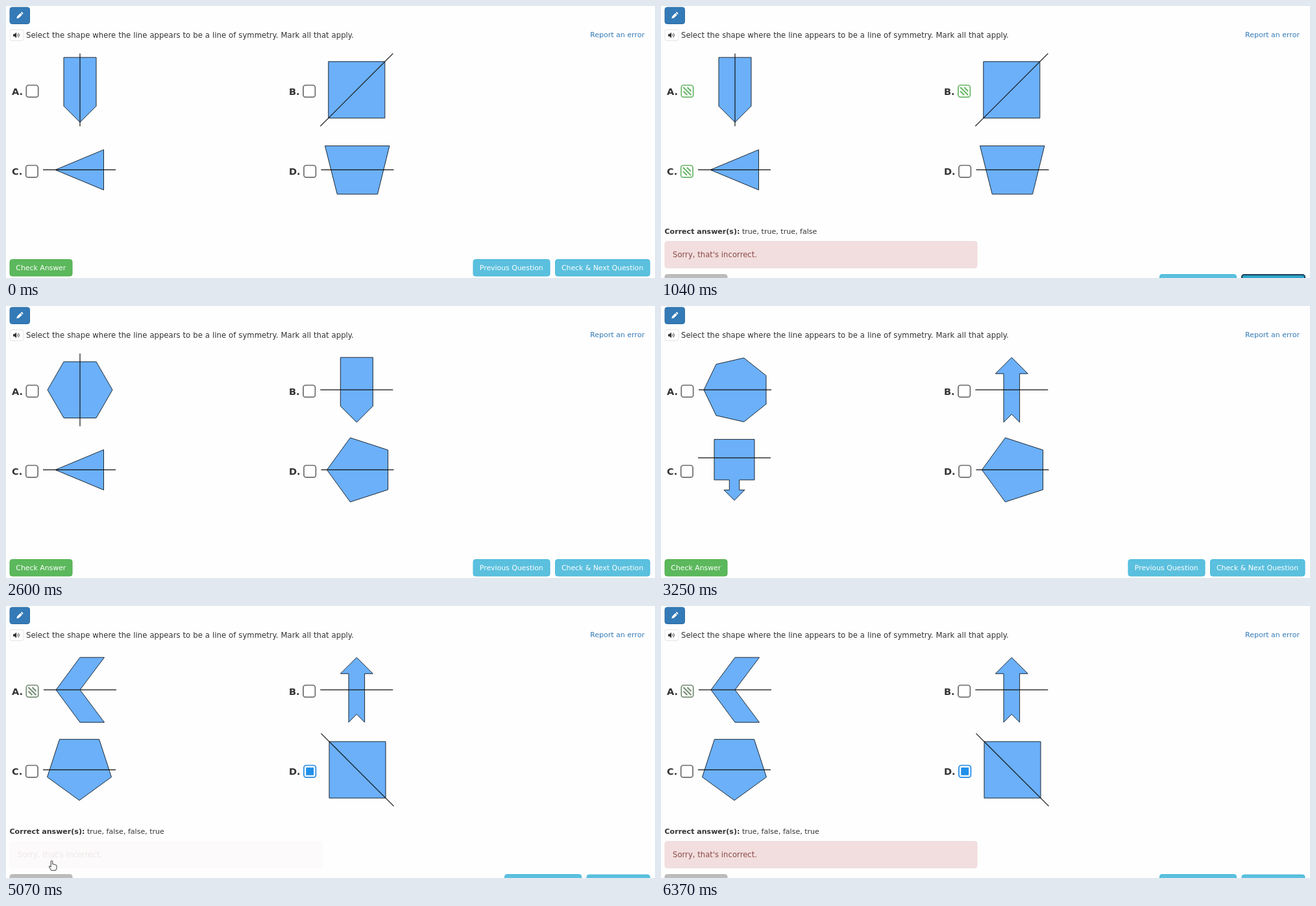
These frames come from a looping animation (1000 by 419 pixels, 7.02 s). An HTML page:

```html
<!DOCTYPE html>
<html lang="en">
<head>
<meta charset="utf-8">
<title>Line of symmetry quiz</title>
<style>
  html, body { margin: 0; width: 100%; height: 100%; overflow: hidden; background: #fefefe; }
  svg { display: block; width: 100%; height: 100%; font-family: "DejaVu Sans", Verdana, sans-serif; fill: #333; }
  .title, .alert text { font-size: 11.66px; }
  .title { word-spacing: .32px; }
  .link { font-size: 11.03px; fill: #337ab7; }
  .label { font-size: 14.6px; font-weight: bold; }
  .answer { font-size: 11.05px; }
  .answer tspan { font-weight: bold; }
  .btn text { font-size: 10.86px; fill: #fff; text-anchor: middle; }
  .success { fill: #5cb85c; stroke: #4cae4c; }
  .info { fill: #5bc0de; stroke: #46b8da; }
  .used { fill: #bcbcbc; stroke: #b8b8b8; }
  .focused { fill: #31a5cb; stroke: #173f55; stroke-width: 2; }
  .shape { fill: #6bb0f9; stroke: #1c2733; stroke-width: 1; }
  .axis { stroke: #111; stroke-width: 1.2; }
  .box { fill: #fff; stroke: #6c6c6c; stroke-width: 1.7; }
  .missed .box, .missed path { stroke: #66b566; }
  .dull .box, .dull path { stroke: #728c70; }
  .missed path, .dull path { stroke-width: 2; }
  .picked .box { stroke: #1e88e5; }
  .picked .dot { fill: #2090ea; }
  .alert rect { fill: #f2dede; stroke: #efdada; }
  .alert text { fill: #8a4a48; }
</style>
</head>
<body>
<svg viewBox="0 0 1000 419">
  <g>
    <rect x="6" y="2" width="30.5" height="25.5" rx="3.5" fill="#337ab7" stroke="#2e6da4"/>
    <g transform="translate(21 14.7) rotate(45)" fill="#fff">
      <path d="M-1.9-3.4H1.9V3.6L0 6.6L-1.9 3.6Z"/>
      <rect x="-1.9" y="-6.4" width="3.8" height="2.2" rx=".8"/>
    </g>
    <rect x="6" y="36.5" width="21" height="17" rx="3" fill="#fff" stroke="#e4e4e4"/>
    <path d="M11 43.3H13L16 40.8V49.2L13 46.7H11Z"/>
    <path d="M17.5 43.3Q18.7 45 17.5 46.7M19.2 41.8Q21.8 45 19.2 48.2" fill="none" stroke="#333" stroke-width=".9"/>
  </g>
  <text class="title" x="31" y="49">Select the shape where the line appears to be a line of symmetry. Mark all that apply.</text>
  <text class="link" x="900" y="47.5">Report an error</text>
  <g id="quiz"></g>

  <g id="open" class="btn">
    <rect class="success" x="6" y="390.5" width="96" height="25.5" rx="3.5"/>
    <text x="53.8" y="407">Check Answer</text>
    <rect class="info" x="720" y="390.5" width="118" height="25.5" rx="3.5"/>
    <text x="778.8" y="407">Previous Question</text>
    <rect class="info" x="846.5" y="390.5" width="145.5" height="25.5" rx="3.5"/>
    <text x="919" y="407">Check &amp; Next Question</text>
  </g>

  <g id="done">
    <text class="answer" x="5.5" y="351"><tspan>Correct answer(s):</tspan> <tspan id="truth" style="font-weight:normal"></tspan></text>
    <g id="alert" class="alert">
      <rect x="6" y="362.5" width="481" height="41" rx="3.5"/>
      <text x="18" y="387">Sorry, that's incorrect.</text>
    </g>
    <rect class="used" x="6" y="413.5" width="96" height="25.5" rx="3.5"/>
    <rect class="info" x="768.5" y="413.5" width="118" height="25.5" rx="3.5"/>
    <rect id="next" x="895" y="414" width="97" height="25.5" rx="3.5"/>
  </g>

  <path id="hand" fill="#fff" stroke="#222" stroke-width=".9" stroke-linejoin="round"
    d="M-1.3 .8Q0-.8 1.3 .8V5.5Q2.6 4.6 3.5 6Q4.8 5.2 5.6 6.6Q7.3 6 7.6 8V11.2L6.2 15H-.8L-3.9 9.8Q-4.2 8-2.6 8.4L-1.3 9.8Z"/>
</svg>
<script>
const LOOP = 7020, STEP = 130;
const $ = id => document.getElementById(id);

// Regular polygon with one corner down, centred on its bounding box
const regular = (n, r) => {
  const lift = n % 2 ? r * (1 - Math.cos(Math.PI / n)) / 2 : 0;
  return Array.from({ length: n }, (_, i) => {
    const a = 2 * Math.PI * i / n;
    return [r * Math.sin(a), r * Math.cos(a) - lift];
  }).join(' ');
};

const shapes = {
  tag: '-25,-50 25,-50 25,25 0,50 -25,25',
  square: '-43.5,-43.5 43.5,-43.5 43.5,43.5 -43.5,43.5',
  triangle: '-37,0 37.5,-31 37.5,31',
  trapezoid: '-50,-37 49.4,-37 31,37.5 -31.2,37.5',
  block: '0,-47 16,-31 7.7,-31 7.7,-15.5 31,-15.5 31,47 -31,47 -31,-15.5 -7.7,-15.5 -7.7,-31 -16,-31',
  arrow: '0,-50 25,-25 12.3,-25 12.3,50 0,37.5 -12.3,50 -12.3,-25 -25,-25',
  chevron: '37.5,-50 0,-50 -37,0 0,50 37.5,50 0,0',
  pentagon: regular(5, 52),
  hexagon: regular(6, 50),
  heptagon: regular(7, 50.5)
};

const axes = { v: [0, 56], h: [56, 0], up: [56, -56], down: [56, 56] };

const slots = [
  { name: 'A.', x: 9, y: 136.5, box: [31.3, 122], mid: [114, 129.2] },
  { name: 'B.', x: 436, y: 136.5, box: [458, 122], mid: [540.3, 129.2] },
  { name: 'C.', x: 9, y: 260, box: [30.7, 245.5], mid: [113, 252.4] },
  { name: 'D.', x: 436, y: 260, box: [459, 245.5], mid: [541.5, 252.4] }
];

// Each option: shape, rotation, axis, vertical shift of the axis
const questions = [
  { at: 0, checked: 130, truth: [true, true, true, false], miss: 'missed',
    options: [['tag', 0, 'v'], ['square', 0, 'up'], ['triangle', 0, 'h'], ['trapezoid', 0, 'h']] },
  { at: 1170, options: [['arrow', 0, 'v'], ['pentagon', 90, 'h'], ['hexagon', 90, 'h'], ['square', 0, 'down']] },
  { at: 1690, options: [['block', 0, 'v'], ['hexagon', 90, 'v'], ['arrow', 90, 'v'], ['heptagon', 0, 'v']] },
  { at: 2080, options: [['chevron', 0, 'h'], ['square', 0, 'up'], ['pentagon', 0, 'v'], ['trapezoid', 0, 'v']] },
  { at: 2600, options: [['hexagon', 90, 'v'], ['tag', 0, 'h'], ['triangle', 0, 'h'], ['pentagon', 90, 'h']] },
  { at: 2860, options: [['tag', 0, 'v'], ['heptagon', 0, 'v'], ['arrow', 90, 'h'], ['square', 0, 'down']] },
  { at: 3250, options: [['heptagon', 90, 'h'], ['arrow', 0, 'h'], ['block', 180, 'h', -18.5], ['pentagon', 90, 'h']] },
  { at: 3380, checked: 4940, truth: [true, false, false, true], miss: 'dull', pick: 3, pickAt: 3900,
    options: [['chevron', 0, 'h'], ['arrow', 0, 'h'], ['pentagon', 0, 'h'], ['square', 0, 'down']] }
];

const path = [
  [3510, 600, 425], [3900, 466, 256], [4030, 470, 258], [4160, 514.5, 278],
  [4810, 70.5, 392.3], [5200, 70.5, 392.3], [5720, 110, 425]
];

const hatch = 'M0 0L12 12M0 6L6 12M6 0L12 6';

function mark(q, i, t) {
  if (q.pick === i && t >= q.pickAt) return 'picked';
  return t >= q.checked && q.truth[i] ? q.miss : '';
}

function drawOption(q, i, t) {
  const { name, x, y, box: [bx, by], mid: [cx, cy] } = slots[i];
  const [shape, turn, axis, shift = 0] = q.options[i];
  const [dx, dy] = axes[axis];
  const state = mark(q, i, t);
  const inner = state === 'picked' ? '<rect class="dot" x="3.2" y="3.2" width="12" height="12" rx="1"/>'
    : state ? `<path transform="translate(3.2 3.2)" d="${hatch}"/>` : '';
  return `<text class="label" x="${x}" y="${y}">${name}</text>
    <g class="${state}" transform="translate(${bx} ${by})">
      <rect class="box" width="18.4" height="18.4" rx="3.5"/>${inner}</g>
    <g transform="translate(${cx} ${cy})">
      <polygon class="shape" points="${shapes[shape]}" transform="rotate(${turn})"/>
      <line class="axis" x1="${-dx}" y1="${shift - dy}" x2="${dx}" y2="${shift + dy}"/></g>`;
}

function moveHand(t) {
  const k = path.findIndex(p => p[0] > t);
  const shown = k > 0;
  $('hand').style.display = shown ? '' : 'none';
  if (!shown) return;
  const [t0, x0, y0] = path[k - 1], [t1, x1, y1] = path[k];
  const u = (t - t0) / (t1 - t0), e = u * u * (3 - 2 * u);
  $('hand').setAttribute('transform', `translate(${x0 + (x1 - x0) * e} ${y0 + (y1 - y0) * e})`);
}

let last = -1;
function render(t) {
  if (t === last) return;
  last = t;
  const q = questions.filter(q => q.at <= t).pop();
  const done = t >= q.checked;
  $('quiz').innerHTML = slots.map((_, i) => drawOption(q, i, t)).join('');
  $('open').style.display = done ? 'none' : '';
  $('done').style.display = done ? '' : 'none';
  if (done) {
    $('truth').textContent = q.truth.join(', ');
    $('alert').style.opacity = Math.min(1, Math.max(0, (t - q.checked - 78) / 442));
    $('next').setAttribute('class', t >= 910 && t < 1170 ? 'focused' : 'info');
  }
  moveHand(t);
}

const start = performance.now();
function tick() {
  const t = (performance.now() - start) % LOOP;
  render(Math.floor(t / STEP) * STEP);
  requestAnimationFrame(tick);
}
tick();
</script>
</body>
</html>
```
